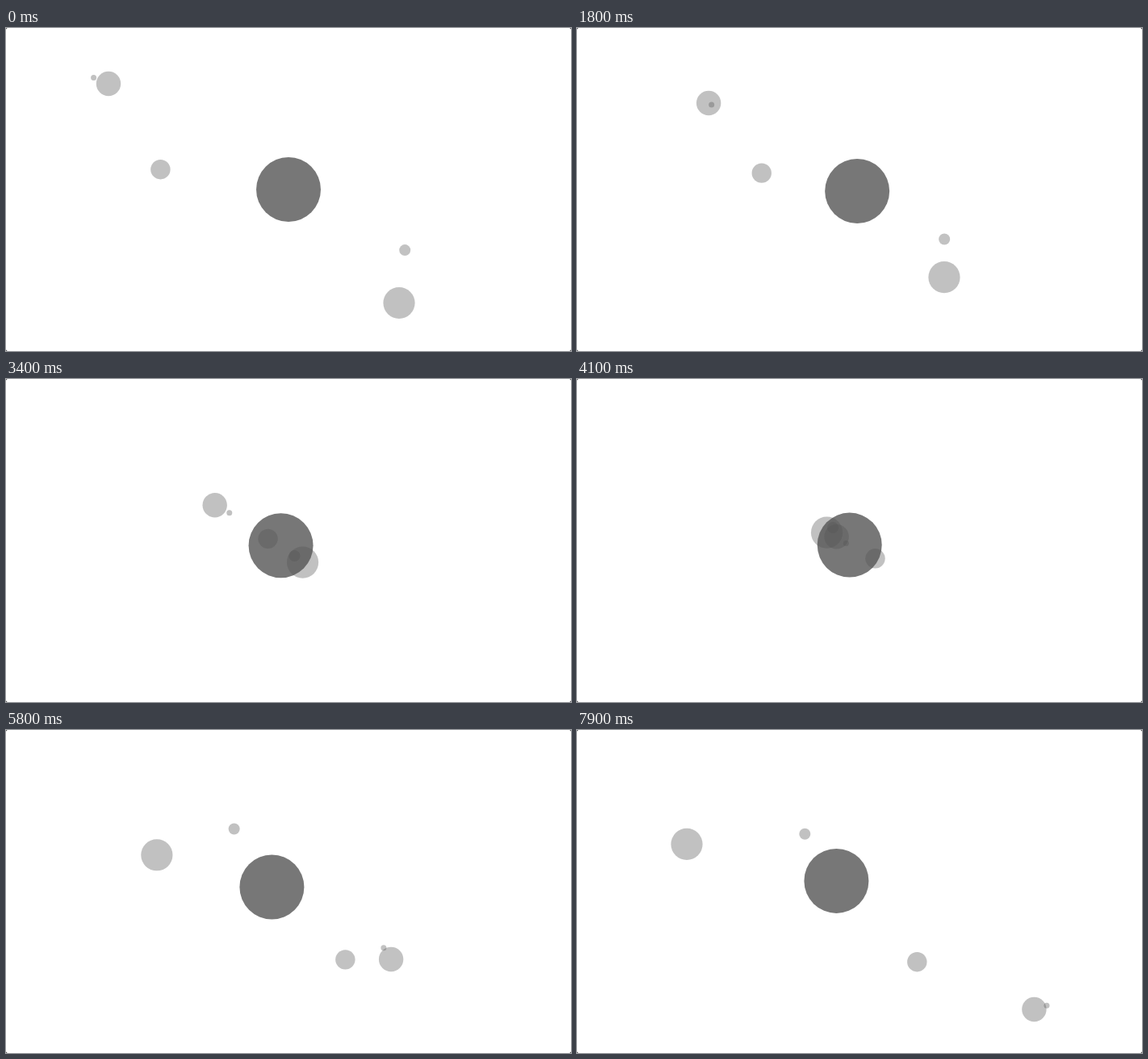
An HTML page that plays this animation: 700 px wide and 400 px high, repeating every 8000 ms.

```html
<!DOCTYPE html>
<html lang="en">
<head>
<meta charset="utf-8">
<title>Falling bodies</title>
<style>
  html, body { margin: 0; width: 100%; height: 100%; overflow: hidden; background: #000; }
  svg { display: block; width: 700px; height: 400px; background: #fff; border-radius: 2px; }
  circle { fill: #555; fill-opacity: .36; }
  #sun { fill-opacity: .8; }
</style>
</head>
<body>
<svg viewBox="0 0 700 400">
  <circle id="sun" r="40"/>
  <circle id="giant" r="19.6"/>
  <circle id="planet" r="15.2"/>
  <circle id="rock" r="12.2"/>
  <circle id="dwarf" r="7"/>
  <circle id="moon" r="3.5"/>
</svg>
<script>
const LOOP = 8000, STEP = 100;

// Every body falls from rest, swings past the sun, then climbs with steady braking.
const REST = 0, NEAR = 2.8, CROSS = 4.1, AWAY = 5, END = 7.9;
const times = [REST, NEAR, CROSS, AWAY, END];
const paths = {
  sun: [[350, 200], [343.1, 204.7], [337.7, 205.6], [333.1, 199.2], [321.4, 186.9]],
  giant: [[487, 340.5], [409.5, 263.5], [309.5, 190.2], [235.5, 168.7], [136, 141.4]],
  planet: [[127, 69], [214.4, 127], [321.6, 195.3], [413.2, 246.6], [566.4, 346]],
  rock: [[191.4, 175.2], [281.8, 186], [369.5, 222.3], [402, 261.8], [421.3, 287.2]],
  dwarf: [[494.2, 275.1], [399.7, 242.2], [317, 184], [295, 144], [282.3, 128.8]]
};

const slope = (p, i, axis) => (p[i + 1][axis] - p[i][axis]) / (times[i + 1] - times[i]);

// Constant acceleration while falling and climbing; a blend of both sides in the swing.
function velocity(p, i, axis) {
  if (times[i] === REST) return 0;
  const before = slope(p, i - 1, axis);
  if (times[i] === NEAR || times[i] === END) return 2 * before - velocity(p, i - 1, axis);
  const a = times[i] - times[i - 1], b = times[i + 1] - times[i];
  return (b * before + a * slope(p, i, axis)) / (a + b);
}

function along(p, t, axis) {
  const i = times.findLastIndex((start, k) => k === 0 || (t >= start && start < END));
  const span = times[i + 1] - times[i], u = (t - times[i]) / span;
  const smooth = u * u * (3 - 2 * u);
  return p[i][axis] + (p[i + 1][axis] - p[i][axis]) * smooth
    + span * u * (u - 1) * ((u - 1) * velocity(p, i, axis) + u * velocity(p, i + 1, axis));
}

// The moon swings through its planet, then is flung into a slowing orbit.
function moonOffset(t) {
  if (t < AWAY) {
    const c = Math.cos(.98 * t);
    return [-18.4 * c, -7.5 * c + t * t / 5];
  }
  const left = 1 - (t - AWAY) / (END - AWAY), turn = 1 - left * left;
  const angle = 2.46 + 3.53 * turn, r = 5.5 + 13.3 * Math.sin(2.2 * turn);
  return [r * Math.cos(angle), r * Math.sin(angle)];
}

function place(name, x, y) {
  const c = document.getElementById(name);
  c.setAttribute('cx', x.toFixed(2));
  c.setAttribute('cy', y.toFixed(2));
}

function draw(t) {
  for (const name in paths) {
    const [x, y] = [0, 1].map(axis => along(paths[name], t, axis));
    place(name, x, y);
    if (name === 'planet') {
      const [dx, dy] = moonOffset(t);
      place('moon', x + dx, y + dy);
    }
  }
}

const start = performance.now();
function frame() {
  const ms = (performance.now() - start) % LOOP;
  draw(Math.floor(ms / STEP) * STEP / 1000);
  requestAnimationFrame(frame);
}
frame();
</script>
</body>
</html>
```
